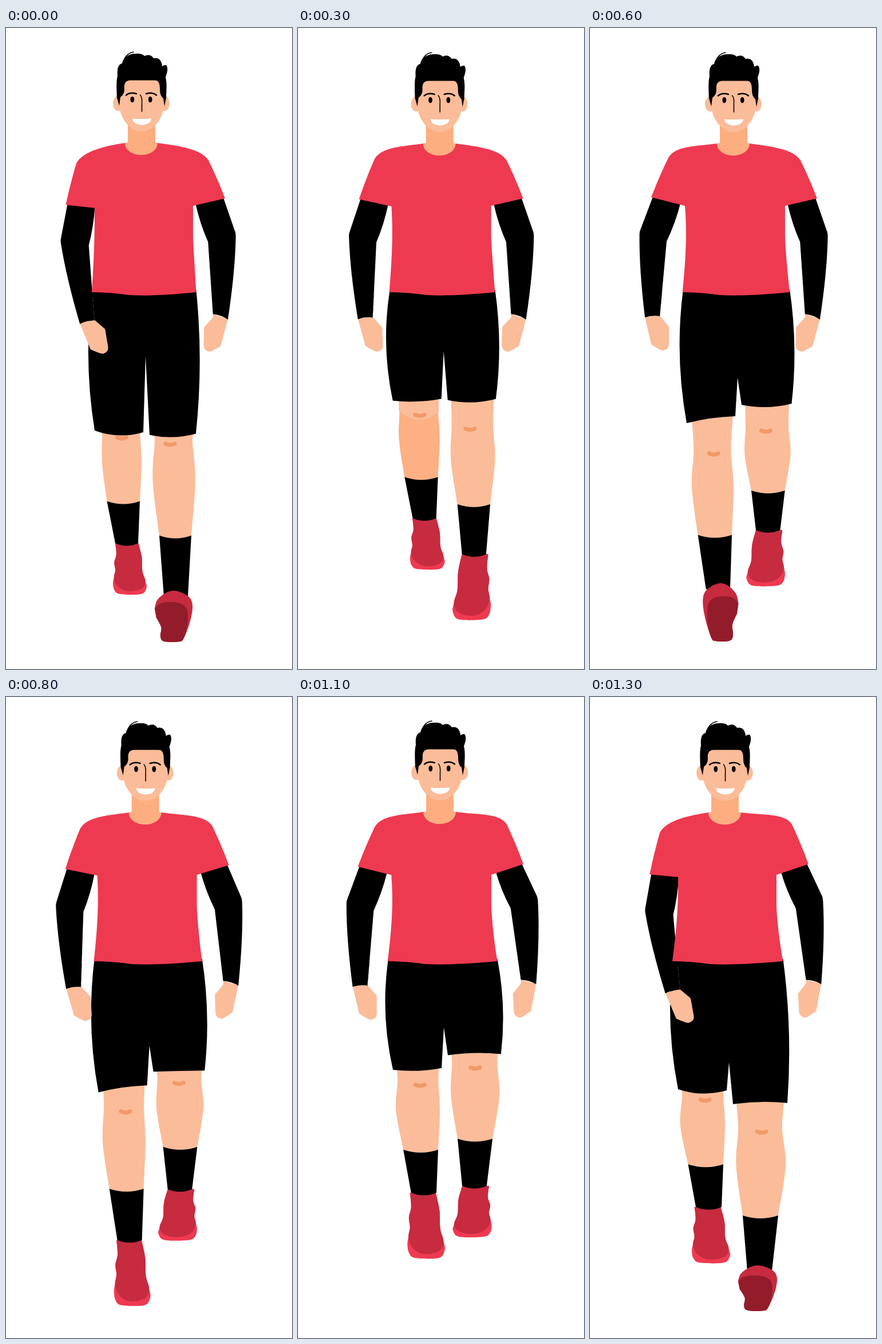
An HTML page that plays this animation: 500x1121 px, repeating every 1400 ms.

```html
<!DOCTYPE html>
<html lang="en">
<head>
<meta charset="utf-8">
<title>Walking man</title>
<style>
  html, body { margin: 0; width: 100%; height: 100%; overflow: hidden; background: #fff; }
  svg { display: block; width: 100%; height: 100%; }
</style>
</head>
<body>
<svg id="stage" viewBox="0 0 500 1121"></svg>
<script>
const STEP = 100, STEPS = 14;
const SKIN = '#fbbc99', SHADE = '#fcb083', KNEE = '#f19a69', RED = '#ee3a50', WINE = '#c62b40', SOLE = '#931c2b';

const mix = (a, b, t) => a + (b - a) * t;
const ramp = (v, from, to) => Math.min(1, Math.max(0, (v - from) / (to - from)));
const wave = step => Math.cos(2 * Math.PI * step / STEPS);

// A looping motion through key values at these steps.
const KEYS = [0, 1, 4, 6, 9, 11, 13, STEPS];
const track = (...values) => step => {
  const i = KEYS.findLastIndex(k => k <= step);
  return mix(values[i], values[(i + 1) % values.length], ramp(step, KEYS[i], KEYS[i + 1]));
};

const sway = track(0, 8, 12, 14, 3, 11, -1);
const swing = track(9.5, 4.3, 1.5, 0, 5, .5, 10.2);

// Edges run thigh, calf, sock top, sock end, shoe; the outer ones widen by `spread`.
const LEFT = {
  side: -1, contact: 6, bentUntil: 12,
  inner: [235.5, 237, 234, 231, 245.5], outer: [167, 168, 176.5, 191, 187], spread: [-6, -9, -4, -5, -8],
  kneeX: () => 202.3,
  hem: track(705.5, 671.5, 639.5, 685, 685.5, 650.5, 687),
  knee: track(717, 686, 673, 745, 716, 679, 705),
  ankle: track(901, 856, 858, 981, 934, 867, 892)
};
const RIGHT = {
  side: 1, contact: 13, bentUntil: 11,
  inner: [257, 256.5, 268, 276, 260], outer: [329, 331, 324, 318, 326], spread: [11, 12, 6, 1, 2],
  kneeX: grow => 287 + 14 * grow,
  hem: track(710.5, 677, 636, 658, 652.5, 625.5, 711),
  knee: track(728, 697, 704, 705, 661, 649, 761),
  ankle: track(994, 947, 907, 878, 852, 855, 1004)
};

// Shoe outlines in a unit box.
const INSTEP = [[.88, .55], [.86, .27], [.76, 0]];
const SHAFT = [[.07, 0], [.1, .22], [.04, .38], [.07, .53], [.03, .67]];
const SHOE = [...SHAFT, [0, .79], [.05, .93], [.22, 1], [.84, 1], [1, .88], [.98, .77], ...INSTEP];
const UPPER = [...SHAFT, [.11, .82], [.32, .92], [.6, .94], [.88, .88], [.97, .74], ...INSTEP];
const HEEL = [[.75, .95], [.65, .99], [.4, 1], [.2, .97], [.15, .87], [.17, .71], [.04, .52]];
const TOE = [[0, .34], [.07, .18], [.3, .04], [.52, 0], [.75, .05], [.93, .14], [1, .28], [.97, .5], [.87, .75], ...HEEL];
const TREAD = [[0, .35], [.15, .25], [.42, .22], [.68, .25], [.84, .34], [.88, .5], [.85, .74], ...HEEL];

const pt = p => p.map(v => +v.toFixed(2)).join();
const fill = (d, color = '#000') => `<path d="${d}" fill="${color}"/>`;
const line = (d, color, w, extra = '') =>
  `<path d="${d}" fill="none" stroke="${color}" stroke-width="${w}" stroke-linecap="round" ${extra}/>`;

// Smooth curve through points, starting from the current point.
function spline(ps) {
  let d = '';
  for (let i = 0; i < ps.length - 1; i++) {
    const a = ps[i - 1] || ps[i], b = ps[i], c = ps[i + 1], e = ps[i + 2] || c;
    d += `C${pt([b[0] + (c[0] - a[0]) / 6, b[1] + (c[1] - a[1]) / 6])} ` +
         `${pt([c[0] - (e[0] - b[0]) / 6, c[1] - (e[1] - b[1]) / 6])} ${pt(c)}`;
  }
  return d;
}

// Quadratic from a to b whose middle is moved by (dx, dy).
const bow = (a, b, dy, dx = 0) => `Q${pt([(a[0] + b[0]) / 2 + 2 * dx, (a[1] + b[1]) / 2 + 2 * dy])} ${pt(b)}`;

function shoe(outline, x, y, w, h, color) {
  const ps = outline.map(p => [x + p[0] * w, y + p[1] * h]);
  return fill('M' + pt(ps[0]) + spline(ps) + 'Z', color);
}

function leg(body, step, grow) {
  const phase = (step - body.contact + STEPS) % STEPS;
  const tipped = phase < 2 || phase === 13;
  const bent = phase >= 10 && phase <= body.bentUntil;
  const hem = body.hem(step), knee = body.knee(step), ankle = body.ankle(step);
  const sock = mix(knee, ankle, .6), calf = mix(knee, sock, .4);
  const inset = (tipped ? 3 : 1) * body.side;
  const out = body.outer.map((x, i) => x + body.spread[i] * grow), inn = body.inner;

  const edge = (xs, pinch) => [[xs[0], hem], [xs[0] + pinch, knee - 5], [xs[1], calf], [xs[2], sock]];
  const outer = edge(out, -inset), inner = edge(inn, inset).reverse();
  const hip = [[out[0], hem - 25], [inn[0], hem - 25]];
  let art = fill(`M${pt(hip[0])}L${pt(outer[0])}${spline(outer)}${bow(outer[3], inner[0], 5)}` +
    `${spline(inner)}L${pt(hip[1])}Z`, bent ? SHADE : SKIN);
  if (bent && phase > 10) {
    const a = [out[0], knee - 8], b = [inn[0], knee - 6];
    art += fill(`M${pt(hip[0])}L${pt(a)}${bow(a, b, 15)}L${pt(hip[1])}Z`, SKIN);
  }
  art += line(`M${pt([body.kneeX(grow) - 8, knee - 1])}q8,4 16,0`, KNEE, 7);

  const a = [out[3], ankle], b = [inn[3], ankle];
  const cloth = fill(`M${pt(outer[3])}${bow(outer[3], inner[0], 5)}L${pt(b)}${bow(b, a, 4.5)}Z`);
  // The left shoe is drawn from its outer edge, the right one mirrored; soles run the other way.
  if (tipped) {
    const top = ankle - 10, h = Math.min(1074, ankle + 92) - top, w = out[4] - inn[4];
    return art + cloth + shoe(TOE, inn[4], top, w, h, WINE) + shoe(TREAD, inn[4], top, w, h, SOLE);
  }
  const h = mix(114, 89, ramp(phase, 5, 8)), w = inn[4] - out[4];
  return art + shoe(SHOE, out[4], ankle, w, h, RED) + shoe(UPPER, out[4], ankle, w, h, WINE) + cloth;
}

function shorts(step, grow, hemL, hemR) {
  const l = LEFT.hem(step), r = RIGHT.hem(step), tilt = 2.5 - 4 * wave(step);
  const waistL = [hemL + 1, 458], waistR = [hemR, 458];
  const lo = [155, l + tilt], li = [240, l - tilt], ri = [251, r + 1], ro = [332 + 14 * grow, r - 1];
  const crotch = [244, (l + r) / 2 - mix(134, 60, ramp(step, 1, 4))];
  return fill(`M${pt(waistL)}${bow(waistL, lo, 0, -9)}${bow(lo, li, 2 + 5 * wave(step))}` +
    `L${pt(crotch)}L${pt(ri)}${bow(ri, ro, mix(5, -3, ramp(step, 6, 9)))}${bow(ro, waistR, 0, 6.5)}Z`);
}

// Sleeve and hand swing about the inner elbow.
function arm(side, top, elbow, deg, cuff, pit) {
  const a = deg * Math.PI / 180, c = Math.cos(a), s = Math.sin(a);
  const at = (x, y) => pt([elbow[0] + x * c + y * s, elbow[1] - x * s + y * c]);
  const start = [top, mix(pit[1], cuff[1], (top - pit[0]) / (cuff[0] - pit[0])) - 2];
  const shoulder = `M${pt(start)}L${pt([cuff[0] - side * 3, cuff[1] - 1])}L`;
  const inside = bow(elbow, start, 1, -side * 1.5) + 'Z';
  if (side < 0) {
    return fill(`M${at(-38, 132)}L${at(-12, 130)}L${at(3, 148)}Q${at(4, 149)} ${at(4, 151)}L${at(4, 180)}Q${at(4, 190)} ${at(-7, 191)}Q${at(-11, 191)} ${at(-27, 180)}Z`, SKIN) +
      fill(`${shoulder}${at(-46, -20)}Q${at(-47.5, -17)} ${at(-47.5, -10)}Q${at(-48, 50)} ${at(-38, 133)}Q${at(-25, 129)} ${at(-12, 131)}L${at(0, 0)}${inside}`) +
      line(`M${at(-8, 90)}L${at(-12, 131)}`, '#555', .6, 'stroke-dasharray="8 4"');
  }
  return fill(`M${at(33, 135)}L${at(7, 126)}L${at(7, 132)}L${at(-8, 148)}Q${at(-9, 149)} ${at(-9, 151)}L${at(-10, 181)}Q${at(-9, 191)} ${at(1, 192)}Q${at(5, 191)} ${at(20, 182)}Z`, SKIN) +
    fill(`${shoulder}${at(47, -19)}Q${at(48.5, -16)} ${at(48.5, -9)}Q${at(47, 50)} ${at(33, 136)}Q${at(22, 128)} ${at(7, 126)}L${at(0, 0)}${inside}`);
}

function shirt(top, hemL, hemR, l, r) {
  return fill(`M208,${top}C175,${top + 5} ${pt([l.shoulder[0] + 12, l.shoulder[1] - 22])} ${pt(l.shoulder)}` +
    `${bow(l.shoulder, l.cuff, -1, -.5)}L${pt(l.pit)}C155,350 155,390 ${pt([hemL, 462])}` +
    `Q${pt([hemL + 35, 462.5])} ${pt([hemL + 65, 467])}Q${pt([hemL + 113, 469.5])} ${pt([hemR, 462])}` +
    `C330,415 327,375 327,362L${pt(r.pit)}L${pt(r.cuff)}${bow(r.cuff, r.shoulder, -1, .5)}` +
    `C${pt([r.shoulder[0] - 12, r.shoulder[1] - 20])} 302,${top + 5} 265,${top}Z`, RED);
}

const HEAD =
  fill('M213,165H261V200L265,201C264,229 209,229 208,201L213,200Z', '#fcae80') +
  `<g fill="${SKIN}"><ellipse cx="196" cy="132" rx="9" ry="13"/><ellipse cx="277" cy="132" rx="9" ry="13"/></g>` +
  fill('M198,85V135C200,163 220,181 237,181C255,181 274,163 276,135V85Z', SKIN) +
  fill('M198,136L194,122C193,105 193,90 195,84C194,72 196,63 203,62C204,53 214,45 225,45Q238,44 242,49Q252,44 258,53' +
    'Q267,51 271,59Q273,63 273,67Q279,63 281,66C284,73 281,80 279,86C282,98 280,112 280,122L277,137L275,123' +
    'Q269,119 269,107C269,95 266,91 259,91.5H217C209,92 206,97 207,107Q207,116 200,121Z') +
  line('M204,64C206,52 213,43 223,42', '#000', 1.7) +
  '<ellipse cx="220.8" cy="125" rx="3.4" ry="5.2"/><ellipse cx="252.2" cy="125" rx="3.4" ry="5.2"/>' +
  line('M210,117.5Q217,111.5 228,115M245,115Q256,111.5 263,117.5', '#000', 2.4) +
  line('M234.5,117Q238.5,121 237.5,133V146', '#000', 1.6) +
  fill('M221,158.5Q238,159.5 254,158.5C253,173 222,173 221,158.5Z', '#fff');

function scene(step) {
  const grow = step / (STEPS - 1), bob = step % 7 % 4 ? 1 : 0;
  const hemL = 150 - 5 * grow, hemR = 332.5 + 6 * grow;
  const a = swing(step), b = .7 + 4.2 * ramp(step, 6, 9);
  // Shoulders and elbows follow the angle of each arm.
  const l = { shoulder: [123, 227 + a], cuff: [93 + 1.2 * a, 296 + 1.4 * a], pit: [152 + .3 * a, 311 + .4 * a] };
  const r = { shoulder: [354, 233 - 2.1 * b], cuff: [383, 299 - 1.4 * b], pit: [327, 311] };
  return `<g transform="translate(${sway(step).toFixed(2)} 0)">` +
    leg(LEFT, step, grow) + leg(RIGHT, step, grow) + shorts(step, grow, hemL, hemR) +
    arm(-1, 144 + 1.2 * a, [120 + 2.6 * a, 373 + .75 * a], a, l.cuff, l.pit) +
    arm(1, 331 + .8 * b, [352 + 1.8 * b, 375 - 1.1 * b], b, r.cuff, r.pit) +
    shirt(201 + bob, hemL, hemR, l, r) +
    `<g transform="translate(0 ${bob})">${HEAD}</g></g>`;
}

const stage = document.getElementById('stage');
const scenes = Array.from({ length: STEPS }, (_, i) => scene(i));
let shown = -1;

function tick(now) {
  const step = Math.floor(now / STEP) % STEPS;
  if (step !== shown) stage.innerHTML = scenes[shown = step];
  requestAnimationFrame(tick);
}
tick(0);
</script>
</body>
</html>
```
